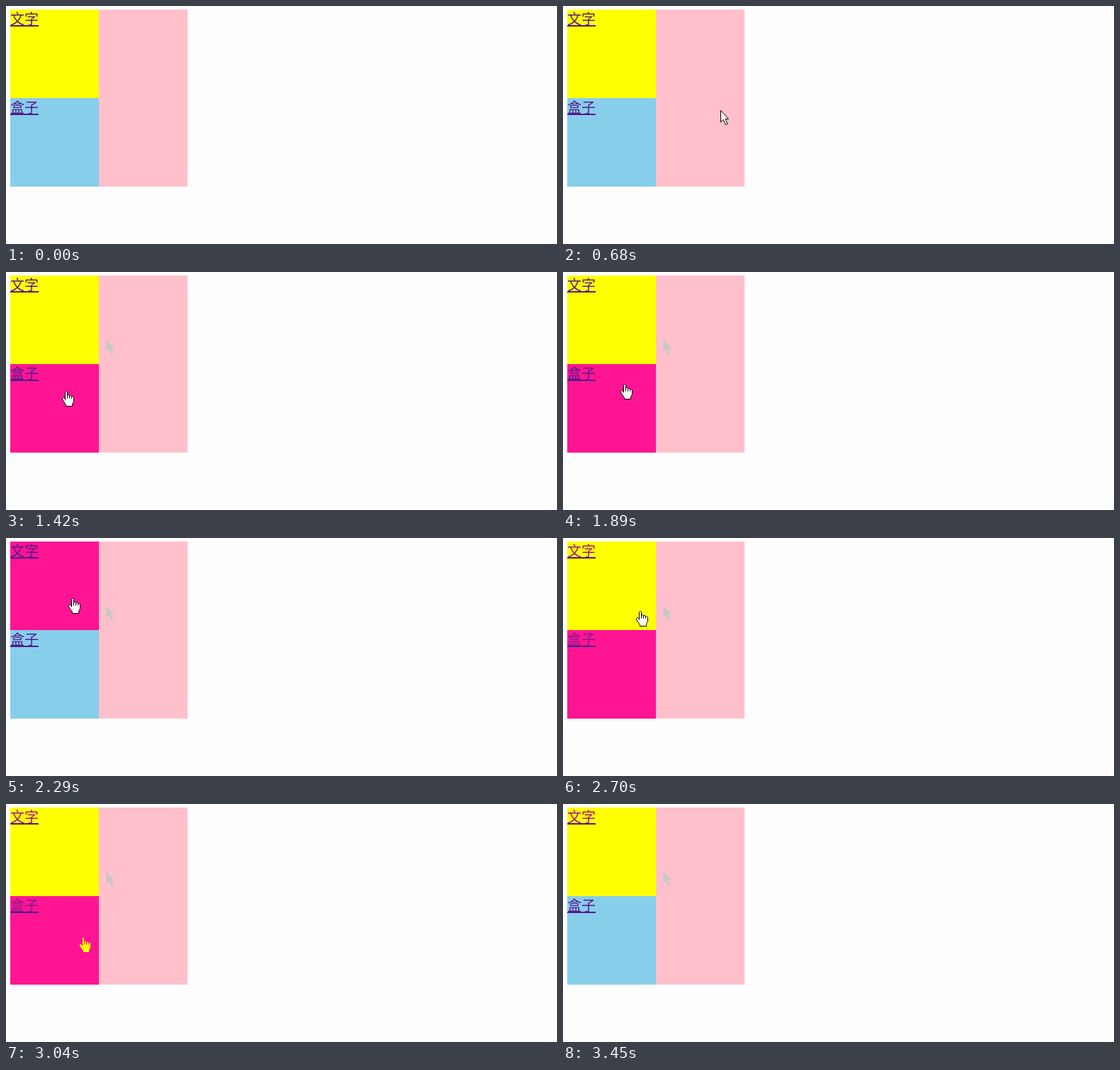
Animation of 777x336 px, one loop 4310 ms. Source, as an HTML page:

```html
<!DOCTYPE html>
<html lang="zh">
<head>
<meta charset="utf-8">
<title>文字 盒子</title>
<style>
html, body { margin: 0; width: 100%; height: 100%; overflow: hidden; background: #fefefe; }
svg { display: block; width: 777px; height: 336px; }
text { font: 300 20px "Noto Sans CJK SC", "Noto Sans CJK", sans-serif; }
</style>
</head>
<body>
<svg viewBox="0 0 777 336">
  <rect x="6" y="5" width="250" height="250" fill="#ffc0cb"/>
  <g id="top">
    <rect x="6" y="5" width="125" height="125"/>
    <text x="6" y="26">文字</text>
    <rect x="6" y="27" width="40" height="2" fill="#551a8b"/>
  </g>
  <g id="bottom">
    <rect x="6" y="130" width="125" height="125"/>
    <text x="6" y="151">盒子</text>
    <rect x="6" y="152" width="40" height="2" fill="#551a8b"/>
  </g>
  <path id="ghost" transform="translate(140 95)" fill="#c8c8c8" d="M1 0L13 12.5H8L11.5 20L9 22L5 14L1 17Z"/>
  <path id="arrow" fill="#fff" stroke="#000" d="M.5 .5V17L4.2 13.4L7.3 20.5L10 19.4L7 12.5H11.5Z"/>
  <path id="hand" d="M4.5 12.5V1.5L5.5 .5H6.5L7.5 1.5V5.5H9.5L10.5 6.5H12.5L13.5 7.5H15L16.5 9V14.5L15.5 16.5L14.5 18.5V21.5H5.5V19.5L3.5 16.5L.5 12V10.5L1.5 9.5H2.5L4.5 11.5M7.5 5.5V10.5M10.5 6.5V10.5M13.5 7.5V10.5"/>
</svg>
<script>
const LOOP = 4310, HOT = '#ff1493', LINK = '#551a8b';
const $ = id => document.getElementById(id);

// Pointer tip: [ms, x, y, hovered box when it lags behind]
const steps = [
  [0],
  [200, 688, 282], [270, 560, 238], [340, 410, 195], [410, 290, 165], [480, 233, 154],
  [680, 222, 147], [750, 190, 123], [880, 140, 95], [950, 125, 82], [1020, 104, 80], [1090, 93, 83],
  [1350, 88, 112], [1420, 84, 168], [1490, 84, 186],
  [1890, 86, 158], [1960, 90, 104], [2030, 92, 88],
  [2290, 93, 85], [2360, 96, 145], [2430, 100, 178], [2500, 103, 104], [2570, 106, 170],
  [2700, 108, 103, 'bottom'], [2770, 108, 90],
  [2840, 108, 112], [2910, 108, 152], [2980, 108, 180], [3040, 108, 188], [3110, 112, 189],
  [3250, 300, 190], [3310, 615, 189], [3380, 755, 315], [3450]
];

const boxAt = (x, y) => x < 131 ? (y < 130 ? 'top' : 'bottom') : '';

function paintBox(id, fill, ink) {
  const [box, label] = $(id).children;
  box.setAttribute('fill', fill);
  label.setAttribute('fill', ink);
}

function place(id, shown, x, y) {
  $(id).style.display = shown ? '' : 'none';
  if (shown) $(id).setAttribute('transform', `translate(${x} ${y})`);
}

function draw(t) {
  const [, x, y, lag] = steps.findLast(s => s[0] <= t);
  const shown = x !== undefined;
  const over = shown ? boxAt(x, y) : '';
  const hover = lag || over;
  const late = t >= 2360;

  paintBox('top', hover === 'top' ? HOT : '#ff0', late && hover !== 'top' ? '#a0128f' : LINK);
  paintBox('bottom', hover === 'bottom' ? HOT : '#87ceeb', late && hover === 'bottom' ? '#8a1a90' : LINK);

  const tinted = over === 'bottom' && t >= 2840;
  $('hand').setAttribute('fill', tinted ? '#ff0' : '#fff');
  $('hand').setAttribute('stroke', tinted ? HOT : '#000');
  place('hand', over, x - 5, y);
  place('arrow', shown && !over, x, y);
  $('ghost').style.display = t >= 950 ? '' : 'none';
}

const start = performance.now();
function tick() {
  draw((performance.now() - start) % LOOP);
  requestAnimationFrame(tick);
}
tick();
</script>
</body>
</html>
```
